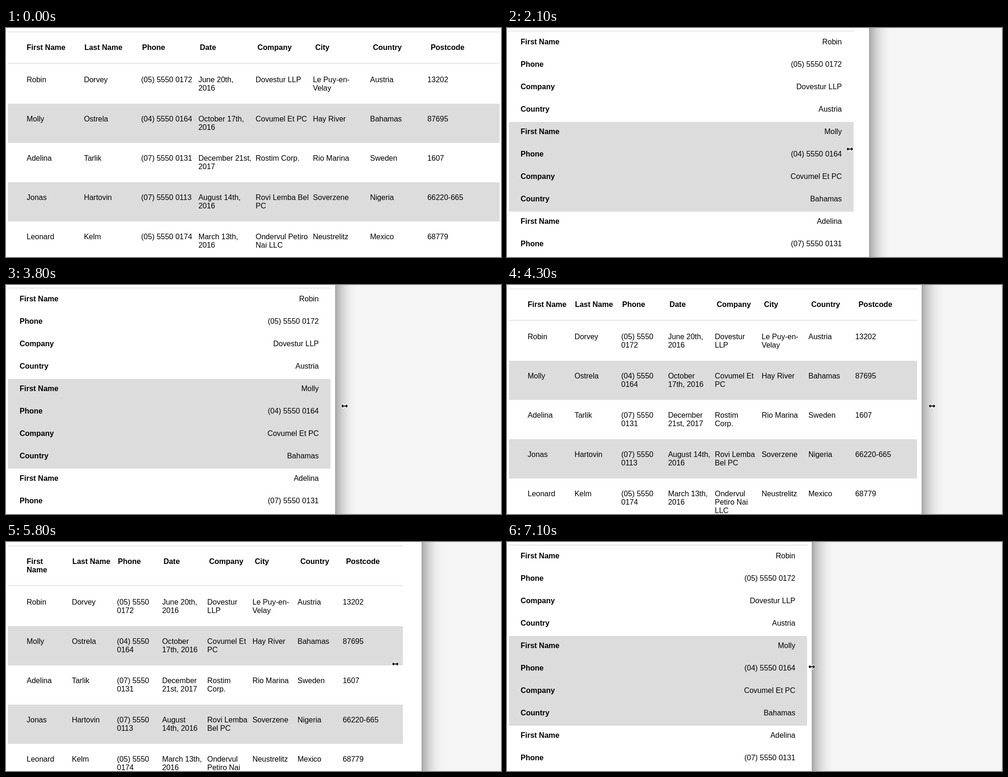
Recreate the animation shown at these times as an HTML page with a canvas. Size 1054 by 490 pixels, loop 7200 ms.

```html
<!DOCTYPE html>
<html lang="en">
<head>
<meta charset="utf-8">
<title>Responsive table</title>
<style>
  html, body { margin: 0; width: 100%; height: 100%; overflow: hidden; background: #fff; }
  canvas { display: block; width: 1054px; height: 490px; }
</style>
</head>
<body>
<canvas id="stage" width="1054" height="490"></canvas>
<script>
const WIDTH = 1054, HEIGHT = 490;
const LOOP = 7200, STEP = 100, BREAKPOINT = 768;
const POINTER_LEAD = 60, WINDOW_LAG = 72;
const LINE = 18, GREY = '#dcdcdc', RULE = '#d2d2d2';
const FONT = '16px "Liberation Sans", Arial, sans-serif';
const ctx = document.getElementById('stage').getContext('2d');

const HEADS = ['First Name', 'Last Name', 'Phone', 'Date', 'Company', 'City', 'Country', 'Postcode'];
const ROWS = [
  ['Robin', 'Dorvey', '(05) 5550 0172', 'June 20th, 2016', 'Dovestur LLP', 'Le Puy-en-Velay', 'Austria', '13202'],
  ['Molly', 'Ostrela', '(04) 5550 0164', 'October 17th, 2016', 'Covumel Et PC', 'Hay River', 'Bahamas', '87695'],
  ['Adelina', 'Tarlik', '(07) 5550 0131', 'December 21st, 2017', 'Rostim Corp.', 'Rio Marina', 'Sweden', '1607'],
  ['Jonas', 'Hartovin', '(07) 5550 0113', 'August 14th, 2016', 'Rovi Lemba Bel PC', 'Soverzene', 'Nigeria', '66220-665'],
  ['Leonard', 'Kelm', '(05) 5550 0174', 'March 13th, 2016', 'Ondervul Petiro Nai LLC', 'Neustrelitz', 'Mexico', '68779']
];
const CARD_FIELDS = ['First Name', 'Phone', 'Company', 'Country'];

// The window is dragged between these turning points.
const TURNS = [
  { ms: 730, width: 1061 },
  { ms: 3090, width: 557 },
  { ms: 5090, width: 1056 },
  { ms: 6522, width: 649 }
];

const clamp = v => Math.min(1, Math.max(0, v));
const ease = u => u * u * (3 - 2 * u);

function widthAt(ms) {
  let width = TURNS[0].width;
  for (let i = 1; i < TURNS.length; i++) {
    const from = TURNS[i - 1], to = TURNS[i];
    width += (to.width - from.width) * ease(clamp((ms - from.ms) / (to.ms - from.ms)));
  }
  return Math.floor(width);
}

function rect(x, y, w, h, color) {
  ctx.fillStyle = color;
  ctx.fillRect(x, y, w, h);
}

function setFont(bold) {
  ctx.font = (bold ? 'bold ' : '') + FONT;
  ctx.fillStyle = '#000';
}

function wrap(text, room) {
  const lines = [''];
  for (const part of text.split(/(?<=\s)|(?<=-)(?=[a-z])/i)) {
    const last = lines.length - 1;
    const joined = lines[last] + part;
    if (lines[last] && ctx.measureText(joined.trimEnd()).width > room) lines.push(part);
    else lines[last] = joined;
  }
  return lines;
}

// Draws one row of wrapped cells and returns its line count.
function drawCells(cells, pitch, gap, baseline) {
  let most = 1;
  cells.forEach((text, i) => {
    const lines = wrap(text, pitch - gap);
    lines.forEach((line, n) => ctx.fillText(line, 44 + i * pitch, baseline + n * LINE));
    most = Math.max(most, lines.length);
  });
  return most;
}

function drawTable(right) {
  setFont(true);
  const extra = (drawCells(HEADS, (right - 68) / 8, 15.5, 47) - 1) * LINE;
  rect(4, 8, right - 4, 1, RULE);
  rect(4, 75 + extra, right - 4, 1, RULE);
  let top = 78 + extra;
  ROWS.forEach((row, i) => {
    if (i % 2) rect(4, top, right - 4, 84, GREY);
    setFont(false);
    top += 48 + LINE * drawCells(row, (right - 76) / 8, 8, top + 38);
  });
}

function drawCards(right) {
  rect(2, 6, right, 1, RULE);
  rect(4, 201, right - 4, 192, GREY);
  ROWS.slice(0, 3).forEach((row, r) => CARD_FIELDS.forEach((field, i) => {
    const y = 35 + (r * CARD_FIELDS.length + i) * 48;
    setFont(true);
    ctx.fillText(field, 29, y);
    setFont(false);
    ctx.textAlign = 'right';
    ctx.fillText(row[HEADS.indexOf(field)], right - 25, y);
    ctx.textAlign = 'left';
  }));
}

function drawDesktop(edge) {
  if (edge >= WIDTH) return;
  rect(edge, 0, WIDTH - edge, HEIGHT, '#f5f5f5');
  const reach = 50;
  for (let x = 0; x < reach; x++) {
    const v = Math.round(245 - 77 * (1 - x / reach) ** 2.2);
    rect(edge + x, 0, 1, HEIGHT, `rgb(${v},${v},${v})`);
  }
  rect(edge, 0, 1, HEIGHT, '#969696');
}

function drawPointer(x, y) {
  ctx.save();
  ctx.translate(x, y);
  ctx.beginPath();
  for (const side of [-1, 1]) {
    ctx.lineTo(side * 3, side);
    ctx.lineTo(side * 3, side * 4);
    ctx.lineTo(side * 7, 0);
    ctx.lineTo(side * 3, side * -4);
    ctx.lineTo(side * 3, -side);
  }
  ctx.closePath();
  ctx.lineWidth = 2;
  ctx.strokeStyle = '#fff';
  ctx.stroke();
  ctx.fillStyle = '#000';
  ctx.fill();
  ctx.restore();
}

function draw(ms) {
  const width = widthAt(ms);
  rect(0, 0, WIDTH, HEIGHT, '#fff');
  if (width >= BREAKPOINT) drawTable(width - 10);
  else drawCards(width - 10);
  drawDesktop(Math.max(width, widthAt(ms - WINDOW_LAG)));
  const drift = Math.max(0, ms - 5500) / 200;
  drawPointer(widthAt(ms + POINTER_LEAD), Math.round(259 + drift));
}

const start = performance.now();
function tick() {
  const ms = (performance.now() - start) % LOOP;
  draw(Math.floor(ms / STEP) * STEP);
  requestAnimationFrame(tick);
}
tick();
</script>
</body>
</html>
```
